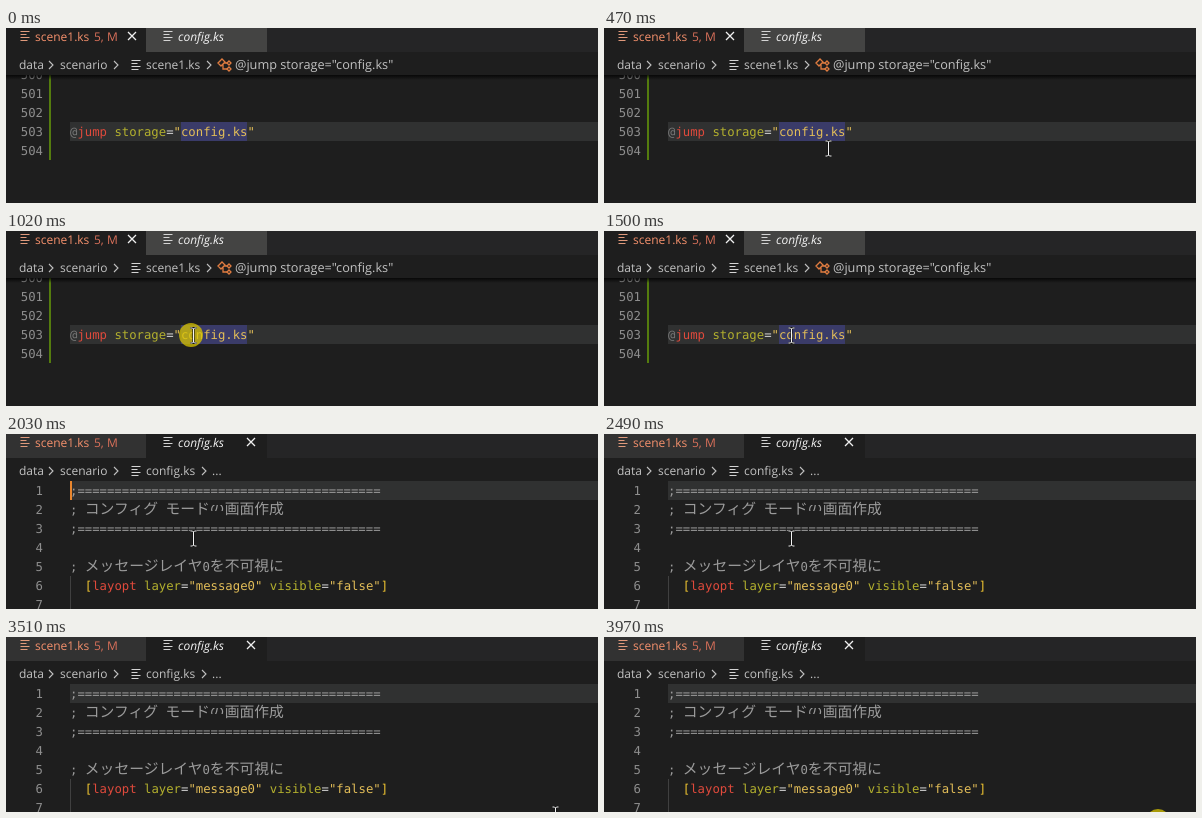
These frames come from a looping animation (592x175 px, 4050 ms). An HTML page:

```html
<!DOCTYPE html>
<html lang="ja">
<head>
<meta charset="utf-8">
<title>Jump to file</title>
<style>
  html, body { margin: 0; width: 592px; height: 175px; overflow: hidden; background: #1e1e1e; }
  svg { display: block; }
  text { white-space: pre; text-rendering: geometricPrecision; }
  .ui { font: 12px "Open Sans", "Noto Sans", sans-serif; fill: #c2c2c2; }
  .wide { font-size: 12.7px; }
  .code { font: 12.29px "DejaVu Sans Mono", monospace; fill: #d4d4d4; }
  .num { fill: #8e8e8e; text-anchor: end; }
  .ja { font: 14.8px "Noto Sans CJK JP", "Noto Sans CJK", sans-serif; }
  .note { fill: #9b9b9b; }
  .tag { fill: #e04a3c; }
  .attr { fill: #b3b02e; }
  .str { fill: #e2bd58; }
  .at { fill: #777; }
  .bracket { fill: #f0c531; }
  .preview { font-style: italic; fill: #f2f2f2; }
  .changed { fill: #f4906c; }
  .badge { fill: #d9705a; }
  .chevron { fill: none; stroke: #c0c0c0; stroke-width: 1.1; }
  .close { stroke: #f0f0f0; stroke-width: 1.3; }
  .lineBg { fill: #303131; }
  .caret { fill: #e8862e; }
</style>
</head>
<body>
<svg width="592" height="175" viewBox="0 0 592 175">
  <defs>
    <linearGradient id="shade" x2="0" y2="1">
      <stop stop-color="#000" stop-opacity=".75"/>
      <stop offset="1" stop-color="#000" stop-opacity="0"/>
    </linearGradient>
    <path id="file" d="M0 0h9M0 3h6M0 6h9M0 9h7" fill="none" stroke-width="1.1"/>
    <path id="chevron" class="chevron" d="M-2-4l4 4-4 4"/>
    <path id="cross" class="close" d="M-4-4l8 8M-4 4l8-8"/>
    <path id="beam" d="M-3-7.5h2l1 1 1-1h2M0-6.5v13M-3 7.5h2l1-1 1 1h2" fill="none"/>
  </defs>
  <rect width="592" height="175" fill="#1e1e1e"/>

  <g id="scene">
    <rect class="lineBg" x="64" y="94" width="528" height="19"/>
    <rect x="175" y="94" width="66" height="19" fill="#3a3b69"/>
    <rect x="43" y="47" width="2" height="85" fill="#547c0e"/>
    <g class="code" id="sceneNums"></g>
    <text class="code" x="64" y="108"><tspan class="at">@</tspan><tspan class="tag">jump</tspan> <tspan class="attr">storage</tspan>=<tspan class="str">"config.ks"</tspan></text>
    <rect y="25" width="592" height="22" fill="#1e1e1e"/>
    <rect y="47" width="592" height="5" fill="url(#shade)"/>
    <rect x="140" width="452" height="24" fill="#252526"/>
    <rect x="140" width="121" height="24" fill="#444443"/>
    <use href="#cross" x="126" y="8"/>
    <text class="ui" x="140" y="41">scene1.ks</text>
    <text class="ui wide" x="229" y="41">@jump storage="config.ks"</text>
    <use href="#chevron" x="203" y="37"/>
    <g fill="none" stroke="#e07c40" stroke-width="1.3">
      <path d="M212 35l4-4 3 3-4 4zM218 35h3M217 36v5h4"/>
      <path d="M221 35l2-2 2 2-2 2zM221 41l2-2 2 2-2 2z"/>
    </g>
  </g>

  <g id="config">
    <rect class="lineBg" x="64" y="47" width="528" height="19"/>
    <path d="M64.5 142v33" stroke="#404040"/>
    <g class="code" id="configNums"></g>
    <g class="code" id="rules"></g>
    <text class="code note" x="64" y="80">; <tspan class="ja">コンフィグ</tspan> <tspan class="ja">モードの画面作成</tspan></text>
    <path d="M204 66h14v5h-14zM204 77h14v5h-14z" fill="#1e1e1e"/>
    <text class="code note" x="64" y="137">; <tspan class="ja">メッセージレイヤ</tspan>0<tspan class="ja">を不可視に</tspan></text>
    <text class="code" x="78.8" y="156"><tspan class="bracket">[</tspan><tspan class="tag">layopt</tspan> <tspan class="attr">layer</tspan>=<tspan class="str">"message0"</tspan> <tspan class="attr">visible</tspan>=<tspan class="str">"false"</tspan><tspan class="bracket">]</tspan></text>
    <rect width="140" height="24" fill="#323232"/>
    <rect x="261" width="331" height="24" fill="#252526"/>
    <use href="#cross" x="245" y="8"/>
    <g class="ui">
      <text x="140" y="41">config.ks</text>
      <text x="206" y="41">...</text>
    </g>
    <use href="#chevron" x="198" y="37"/>
  </g>

  <use href="#file" x="14.5" y="3.5" stroke="#e09a7c"/>
  <use href="#file" x="157.5" y="3.5" stroke="#d4d4d4"/>
  <use href="#file" x="125.5" y="32.5" stroke="#d4d4d4"/>
  <g class="ui">
    <text class="changed" x="29" y="12.5">scene1.ks</text>
    <text class="badge" x="88" y="12.5">5, M</text>
    <text class="preview" x="172" y="12.5">config.ks</text>
    <text x="13" y="41">data</text>
    <text x="54" y="41">scenario</text>
  </g>
  <use href="#chevron" x="45" y="37"/>
  <use href="#chevron" x="110" y="37"/>

  <rect id="caret" class="caret" width="2" height="19"/>
  <circle id="click" r="12" fill="#d8c400" fill-opacity=".75"/>
  <g id="mouse">
    <use href="#beam" x=".5" y="-.5" stroke="#111" stroke-width="2.2"/>
    <use href="#beam" x=".5" y="-.5" stroke="#f4f4f4"/>
  </g>
</svg>
<script>
  const LOOP = 4050, OPEN = 2030;
  const $ = id => document.getElementById(id);

  // Each step: start time, then x and y; no position means hidden.
  const mouseSteps = [
    [0], [130, 497, 168], [200, 440, 159], [270, 372, 148], [340, 312, 138],
    [400, 262, 129], [470, 224, 121], [540, 207, 115], [610, 200, 112],
    [680, 191, 107], [750, 187, 105], [2810, 203, 108], [2880, 245, 119],
    [2960, 297, 136], [3040], [3420, 549, 178], [3660]
  ];
  const caretSteps = [[0], [1090, 181, 94], [1500], [OPEN, 64, 47], [2490], [3040, 64, 47], [3500]];
  const clickSteps = [[0], [950, 185, 104], [1090], [3970, 554, 184]];

  function numberLines(id, first, last, y) {
    for (let n = first; n <= last; n++, y += 19) {
      $(id).innerHTML += `<text class="num" x="37" y="${y}">${n}</text>`;
    }
  }

  function place(id, steps, t) {
    const [, x, y] = steps.findLast(s => s[0] <= t);
    const el = $(id);
    el.style.display = x === undefined ? "none" : "";
    if (x !== undefined) el.setAttribute("transform", `translate(${x} ${y})`);
  }

  function draw(now) {
    const t = Math.max(0, now - start) % LOOP;
    $("scene").style.display = t < OPEN ? "" : "none";
    $("config").style.display = t < OPEN ? "none" : "";
    place("mouse", mouseSteps, t);
    place("caret", caretSteps, t);
    place("click", clickSteps, t);
    requestAnimationFrame(draw);
  }

  numberLines("sceneNums", 500, 504, 51);
  numberLines("configNums", 1, 7, 61);
  for (const y of [61, 99]) {
    $("rules").innerHTML += `<text class="note" x="64" y="${y}">;${"=".repeat(41)}</text>`;
  }
  const start = performance.now();
  draw(start);
</script>
</body>
</html>
```
